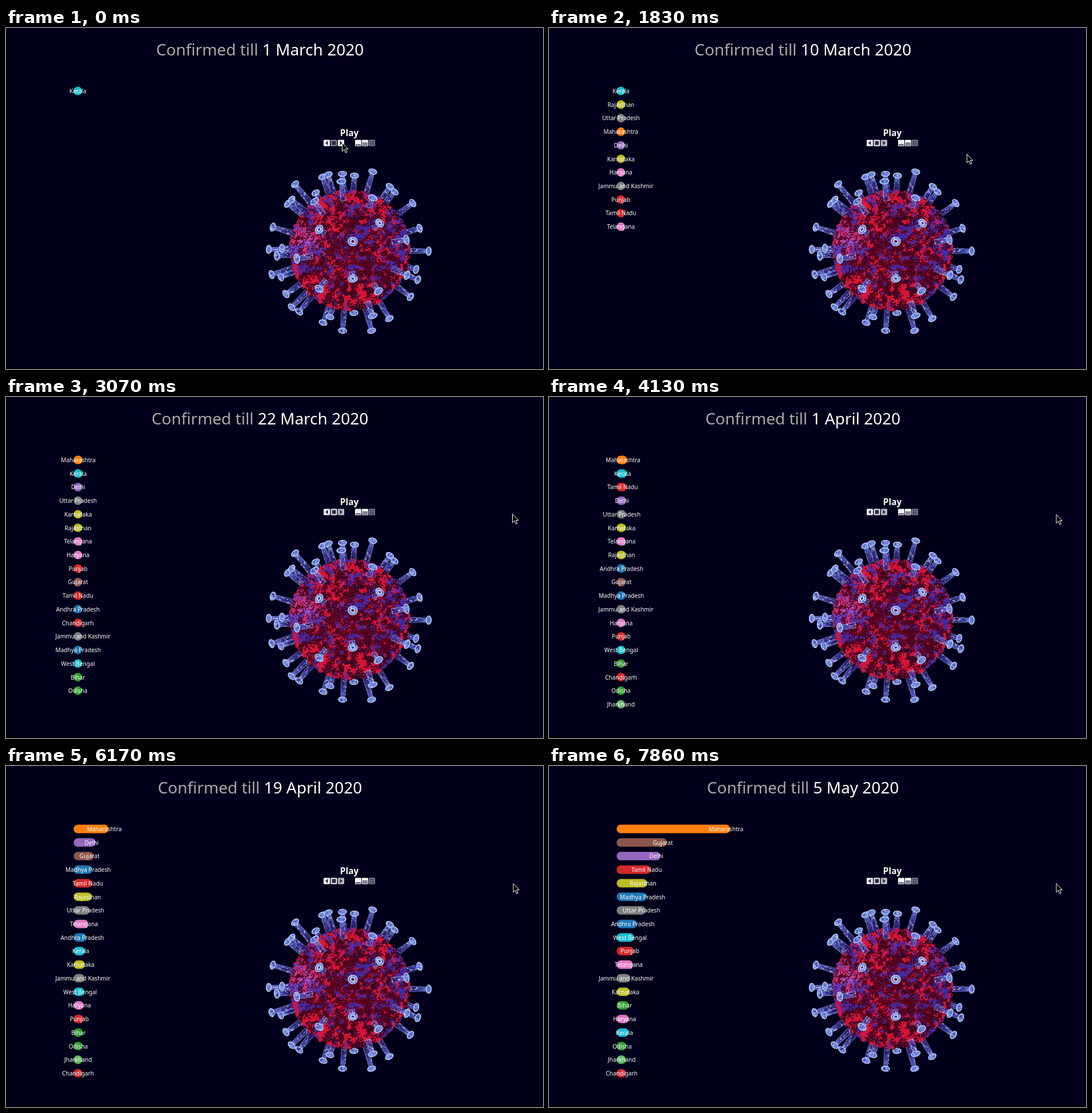
Write an HTML page with a canvas that moves like this. It is 940 px wide and 596 px high and loops after 8000 ms.

```html
<!DOCTYPE html>
<html lang="en">
<head>
<meta charset="utf-8">
<title>Confirmed cases by state</title>
<style>
html, body { margin: 0; width: 100%; height: 100%; overflow: hidden; background: #00001a; }
body { position: relative; font-family: "Noto Sans", "Open Sans", sans-serif; color: #fff; }
canvas { position: absolute; left: 0; top: 0; display: block; }
div { position: absolute; white-space: pre; }
#title { left: 0; top: 17px; width: 889px; text-align: center; font-size: 28px; line-height: 40px; }
#title span { color: #aaa; }
#play { left: 551px; top: 174px; width: 100px; text-align: center; font: bold 15.4px/20px "Noto Sans", "Open Sans", sans-serif; }
.label { left: 0; top: 0; font-size: 10.1px; font-weight: 500; line-height: 16px; }
</style>
</head>
<body>
<canvas id="stage" width="940" height="596"></canvas>
<div id="title"><span>Confirmed till </span><b id="date" style="font-weight:400"></b></div>
<div id="play">Play</div>
<script>
const LOOP = 8000, BG = '#00001a';
const ctx = document.getElementById('stage').getContext('2d');
const dateEl = document.getElementById('date');

// Days counted from 1 March; each state: name, colour, first day, cases on KEY_DAYS[1..]
const KEY_DAYS = [1, 10, 22, 32, 39, 50, 66];
const CYAN = '#17becf', OLIVE = '#bcbd22', GREY = '#7f7f7f', PINK = '#e377c2',
      RED = '#d62728', BLUE = '#1f77b4', GREEN = '#2ca02c';
const states = [
  ['Kerala', CYAN, 1, 14, 52, 241, 345, 400, 500],
  ['Rajasthan', OLIVE, 3, 10, 25, 93, 350, 1351, 3061],
  ['Uttar Pradesh', GREY, 4, 9, 28, 113, 361, 1050, 2840],
  ['Maharashtra', '#ff7f0e', 9, 5, 67, 302, 1135, 3651, 14541],
  ['Delhi', '#9467bd', 2, 4, 29, 152, 669, 1893, 4898],
  ['Karnataka', OLIVE, 8, 4, 26, 110, 181, 384, 651],
  ['Haryana', PINK, 4, 3, 21, 43, 167, 225, 517],
  ['Jammu and Kashmir', GREY, 9, 2, 4, 62, 158, 341, 726],
  ['Punjab', RED, 9, 1, 21, 42, 99, 202, 1233],
  ['Tamil Nadu', RED, 7, 1, 7, 234, 738, 1372, 3550],
  ['Telangana', PINK, 2, 1, 22, 96, 427, 844, 1085],
  ['Gujarat', '#8c564b', 19, 1, 18, 82, 179, 1604, 5804],
  ['Andhra Pradesh', BLUE, 12, 1, 5, 87, 348, 603, 1650],
  ['Chandigarh', RED, 19, 1, 5, 16, 18, 23, 102],
  ['Madhya Pradesh', BLUE, 21, 1, 4, 66, 229, 1407, 3000],
  ['West Bengal', CYAN, 18, 1, 4, 37, 103, 310, 1259],
  ['Bihar', GREEN, 22, 1, 2, 23, 38, 86, 528],
  ['Odisha', GREEN, 16, 1, 2, 4, 42, 61, 169],
  ['Jharkhand', '#5cb560', 31, 1, 1, 2, 4, 34, 115]
].map(([name, color, since, ...cases]) => {
  const el = document.createElement('div');
  el.className = 'label';
  el.textContent = name;
  document.body.append(el);
  return { color, since, cases: [1, ...cases], el, width: el.getBoundingClientRect().width };
});

// Bursts of day changes: first ms, last ms, number of days
const BURSTS = [
  [960, 1740, 8], [1830, 2430, 7], [2600, 3070, 6], [3200, 3300, 2], [3450, 3530, 2],
  [3670, 3840, 3], [3980, 4130, 3], [4300, 4360, 2], [4530, 4600, 2], [4760, 4840, 2],
  [4990, 5160, 3], [5310, 5460, 3], [5610, 5690, 2], [5850, 6000, 3], [6170, 6320, 3],
  [6470, 6550, 2], [6700, 6780, 2], [6930, 7100, 3], [7250, 7330, 2], [7480, 7620, 3],
  [7790, 7860, 2]
];
const CURSOR = [
  [0, 588, 200], [880, 588, 200], [960, 596, 201], [1740, 707, 217], [1829, 707, 217],
  [1830, 731, 220], [2430, 825, 213], [2599, 825, 213], [2700, 852, 209],
  [3070, 886, 204], [3300, 887.5, 205], [LOOP, 887.5, 205]
];

function dayAt(t) {
  let day = 1;
  for (const [from, to, n] of BURSTS) {
    if (t < from) break;
    day += Math.min(n, 1 + Math.floor((t - from) / (to - from) * (n - 1) + 1e-6));
  }
  return day;
}

function dateText(day) {
  if (day <= 31) return day + ' March 2020';
  return day <= 61 ? day - 31 + ' April 2020' : day - 61 + ' May 2020';
}

function casesAt(state, day) {
  let i = 0;
  while (i < KEY_DAYS.length - 2 && day >= KEY_DAYS[i + 1]) i++;
  const k = (day - KEY_DAYS[i]) / (KEY_DAYS[i + 1] - KEY_DAYS[i]);
  const a = state.cases[i], b = state.cases[i + 1];
  return k === 1 ? b : a * Math.pow(b / a, k);
}

// ---- virus picture, drawn once ----
const CX = 601, CY = 388, R = 107;
let seed = 7;
function rand() {
  seed = (seed * 1664525 + 1013904223) >>> 0;
  return seed / 4294967296;
}
function hash(x, y) {
  const s = Math.sin(x * 127.1 + y * 311.7) * 43758.5453;
  return s - Math.floor(s);
}
function noise(x, y) {
  const ix = Math.floor(x), iy = Math.floor(y);
  let u = x - ix, v = y - iy;
  u *= u * (3 - 2 * u);
  v *= v * (3 - 2 * v);
  const top = hash(ix, iy) * (1 - u) + hash(ix + 1, iy) * u;
  const low = hash(ix, iy + 1) * (1 - u) + hash(ix + 1, iy + 1) * u;
  return top * (1 - v) + low * v;
}
const clamp = v => Math.max(0, Math.min(1, v));
const mix = (a, b, k) => a.map((v, i) => v + (b[i] - v) * k);

function makeCanvas(w, h) {
  const c = document.createElement('canvas');
  c.width = w;
  c.height = h;
  return c;
}

function makeBody() {
  const size = 2 * R + 12, half = size / 2;
  const c = makeCanvas(size, size), g = c.getContext('2d');
  const img = g.createImageData(size, size);
  for (let y = 0; y < size; y++) for (let x = 0; x < size; x++) {
    const dx = (x - half) / R, dy = (y - half) / R, d = Math.hypot(dx, dy);
    const alpha = clamp((0.97 + 0.05 * noise(x / 5, y / 5) - d) * 50);
    if (!alpha) continue;
    const rim = d ** 4, patch = noise(x / 28, y / 28);
    const grain = noise(x / 2, y / 2), mid = noise(x / 7 + 40, y / 7);
    const hot = grain * 0.5 + mid * 0.5 + rim * 0.14 + (patch - 0.5) * 0.2 - dx * 0.05;
    const cold = noise(x / 2.2 + 90, y / 2.2) * 0.5 + noise(x / 9 + 70, y / 9) * 0.5
      + rim * 0.1 + (0.5 - patch) * 0.3 + dx * 0.05 - dy * 0.05 - 0.04;
    let col = mix([92, 3, 26], [24, 3, 36], clamp(patch * 0.5 + rim * 0.35 + (grain - 0.5) * 0.9));
    col = mix(col, [220, 22, 56], clamp((hot - 0.55) * 6));
    col = mix(col, [62, 50, 190], clamp((cold - 0.58) * 7) * 0.85);
    const glow = clamp(1 - Math.hypot(dx + 0.74, dy + 0.15) * 2.6);
    col = mix(col, [176, 96, 216], glow * clamp(grain * 1.8 - 0.5));
    img.data.set([...col, alpha * 255], (y * size + x) * 4);
  }
  g.putImageData(img, 0, 0);
  return c;
}

// Spike head positions: around the outline, then on the front with the stem length
const OUTER = [
  [506, 273], [554, 260], [564, 256], [589, 255], [610, 258], [642, 251], [672, 277], [680, 286],
  [712, 306], [724, 350], [740, 390], [718, 422], [721, 440], [708, 470], [671, 508], [640, 529],
  [589, 529], [555, 515], [567, 505], [609, 498], [513, 496], [500, 488], [490, 465], [481, 435],
  [465, 431], [460, 387], [483, 385], [467, 348], [493, 307], [500, 300], [542, 288]
];
const FRONT = [
  [540, 303, 28], [587, 268, 34], [642, 297, 18], [654, 341, 14], [701, 370, 26], [607, 373, 0],
  [607, 438, 12], [548, 352, 13], [509, 403, 28], [548, 456, 20], [652, 460, 15], [642, 503, 26],
  [702, 432, 28], [474, 398, 24]
];
const TINTS = ['#eef4ff', '#a9bcf8', '#6f86e6', '#3238a8', '#130f40'];

function specks(g, n, x, y, w, h) {
  for (let i = 0; i < n; i++) {
    g.fillStyle = TINTS[Math.floor(rand() * TINTS.length)];
    g.globalAlpha = 0.35 + rand() * 0.5;
    g.fillRect(x + rand() * w, y + (rand() - 0.5) * h, 1 + rand() * 3, 1 + rand() * 0.8);
  }
  g.globalAlpha = 1;
}

function spike(g, x, y, len, front) {
  const d = Math.hypot(x - CX, y - CY) / R, flat = front ? clamp(1 - d) : 0;
  g.save();
  g.translate(x, y);
  g.rotate(Math.atan2(CY - y, CX - x));
  if (len) {
    const fill = g.createLinearGradient(0, 0, len, 0);
    fill.addColorStop(0, 'rgba(126,140,236,.85)');
    fill.addColorStop(0.5, 'rgba(72,72,176,.75)');
    fill.addColorStop(1, 'rgba(70,36,140,.5)');
    g.fillStyle = fill;
    g.strokeStyle = 'rgba(150,166,250,.6)';
    g.beginPath();
    g.moveTo(2, -3.5);
    g.lineTo(len, -5);
    g.lineTo(len, 5);
    g.lineTo(2, 3.5);
    g.fill();
    g.stroke();
    specks(g, len * 0.9, 2, 0, len - 4, 8);
  }
  const rx = 4.4 + flat * 3.6, ry = front ? 8 : 7.2;
  g.beginPath();
  g.ellipse(0, 0, rx, ry, 0, 0, 7);
  g.fillStyle = '#6d82d6';
  g.fill();
  g.strokeStyle = '#b4c8fa';
  g.lineWidth = 1.6;
  g.stroke();
  specks(g, 10, -rx + 0.5, 0, rx * 1.2, ry * 1.5);
  if (flat > 0.3) {
    g.beginPath();
    g.ellipse(0, 0, rx * 0.45, ry * 0.45, 0, 0, 7);
    g.fillStyle = flat > 0.8 ? '#6a1034' : '#3c3f9c';
    g.fill();
    g.strokeStyle = '#e2ebff';
    g.stroke();
  }
  g.restore();
}

function makeScene() {
  const c = makeCanvas(940, 596), g = c.getContext('2d');
  g.fillStyle = BG;
  g.fillRect(0, 0, 940, 596);
  g.fillStyle = '#000';
  g.fillRect(0, 594, 940, 2);
  for (const [x, y] of OUTER) spike(g, x, y, Math.hypot(x - CX, y - CY) - R + 4, false);
  const body = makeBody();
  g.drawImage(body, CX - body.width / 2, CY - body.height / 2);
  g.strokeStyle = 'rgba(84,44,180,.55)';
  g.lineWidth = 1.3;
  for (const [x, y, len] of FRONT) {
    const a = Math.atan2(CY - y, CX - x);
    if (Math.hypot(x - CX, y - CY) < R) {
      g.beginPath();
      g.arc(x + Math.cos(a) * len, y + Math.sin(a) * len, len ? 12 : 22, a - 1.5, a + (len ? 1.5 : 4));
      g.stroke();
    }
  }
  for (const [x, y, len] of FRONT) spike(g, x, y, len, true);
  return c;
}
const scene = makeScene();

// ---- moving parts ----
function button(x, color, glyph) {
  ctx.fillStyle = color;
  ctx.beginPath();
  ctx.roundRect(x, 195.5, 11, 11, 1);
  ctx.fill();
  ctx.fillStyle = '#2a2b45';
  glyph(x);
}

function arrow(dir) {
  return x => {
    const m = x + 5.5;
    ctx.beginPath();
    ctx.moveTo(m + dir * 2.5, 201);
    ctx.lineTo(m - dir * 2, 197);
    ctx.lineTo(m - dir * 2, 205);
    ctx.fill();
  };
}

function lines(n) {
  return x => {
    for (let i = 0; i < n; i++) ctx.fillRect(x + 1, 203.5 - i * 3, 9, 1.6);
  };
}

function drawButtons(playing) {
  const on = '#f4f4f6', off = '#8e8f9a';
  button(556, on, arrow(-1));
  button(568.5, playing ? on : off, x => ctx.fillRect(x + 2, 197.5, 7, 7));
  button(581, playing ? '#b9bac0' : on, arrow(1));
  button(611, on, lines(1));
  button(623, on, lines(2));
  button(635, off, lines(3));
}

function drawCursor(t) {
  let i = 0;
  while (i < CURSOR.length - 2 && t >= CURSOR[i + 1][0]) i++;
  const [p, q] = [CURSOR[i], CURSOR[i + 1]];
  const [, x, y] = mix(p, q, (t - p[0]) / (q[0] - p[0]));
  ctx.save();
  ctx.translate(x + 0.5, y + 0.5);
  ctx.beginPath();
  ctx.moveTo(0, 0);
  for (const [px, py] of [[0, 15], [3.4, 11.8], [6, 17.6], [8.4, 16.5], [5.9, 11], [10.4, 11]]) ctx.lineTo(px, py);
  ctx.closePath();
  ctx.fillStyle = '#000';
  ctx.fill();
  ctx.strokeStyle = '#fff';
  ctx.lineWidth = 1;
  ctx.stroke();
  ctx.restore();
}

function drawBars(day) {
  const shown = [];
  for (const s of states) {
    s.el.style.visibility = day >= s.since ? 'visible' : 'hidden';
    if (day >= s.since) shown.push({ s, cases: casesAt(s, day) });
  }
  shown.sort((a, b) => b.cases - a.cases);
  shown.forEach(({ s, cases }, row) => {
    const y = 110 + row * 23.72, len = cases / 79;
    ctx.fillStyle = s.color;
    ctx.beginPath();
    ctx.roundRect(118.4, y - 7.4, len + 14.8, 14.8, 7.4);
    ctx.fill();
    const left = Math.max(86.5, 125.8 + len - s.width / 2);
    s.el.style.transform = `translate(${left}px, ${y - 8}px)`;
  });
}

function draw(t) {
  const day = dayAt(t);
  ctx.drawImage(scene, 0, 0);
  dateEl.textContent = dateText(day);
  drawBars(day);
  drawButtons(t >= 730);
  if (t >= 500 && t < 730) {
    ctx.fillStyle = 'rgba(255,255,0,.47)';
    ctx.beginPath();
    ctx.arc(588, 200, 11, 0, 7);
    ctx.fill();
  }
  drawCursor(t);
}

const start = performance.now();
function tick() {
  draw((performance.now() - start) % LOOP);
  requestAnimationFrame(tick);
}
tick();
</script>
</body>
</html>
```
